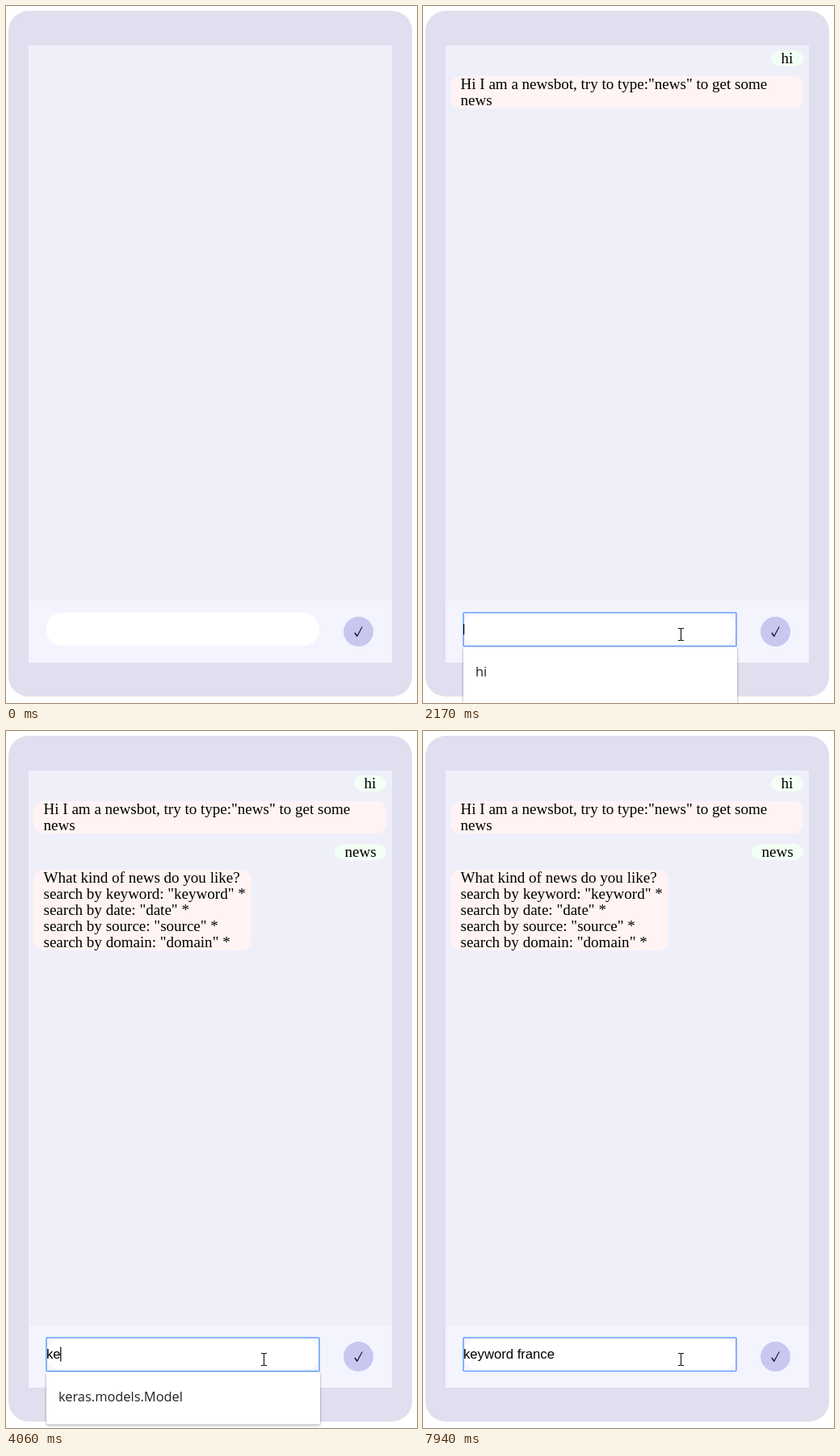
These frames come from a looping animation (509 px wide and 864 px high, 8000 ms). An HTML page:

```html
<!DOCTYPE html>
<html lang="en">
<head>
<meta charset="utf-8">
<title>News bot chat</title>
<style>
  html, body { margin: 0; width: 100%; height: 100%; overflow: hidden; background: #fff; }
  svg { display: block; width: 509px; height: 864px; }
  text { white-space: pre; }
  .chat { font: 19.05px "Liberation Serif", serif; fill: #000; }
  .field { font: 16.67px "Liberation Sans", sans-serif; fill: #000; }
  .menu text { font: 16.4px "Open Sans", sans-serif; fill: #222; }
  .menu rect { fill: #fff; filter: drop-shadow(0 1px 1.5px rgba(0, 0, 0, .4)); }
</style>
</head>
<body>
<svg id="stage" viewBox="0 0 509 864">
  <rect x="3" y="6" width="500" height="850" rx="25" fill="#e0dfef"/>
  <rect x="28" y="49" width="450" height="765" fill="#efeffa"/>
  <rect x="28" y="737" width="450" height="77" fill="#f4f4ff"/>
  <rect x="50" y="752" width="338" height="41" rx="20" fill="#fff"/>
  <circle cx="436.5" cy="775.5" r="18.5" fill="#c7c7f0"/>
  <path d="M431.3 777.2L432.6 776.6L434.8 780L440.6 769.4L441.8 769.4L435.2 781.8L434.2 781.8Z" fill="#15101c"/>
  <g id="log" class="chat"></g>
  <rect id="ring" x="50" y="752" width="338" height="41.5" rx="1" fill="none" stroke="#6aa2f6" stroke-width="1.6"/>
  <text id="typed" class="field" x="50" y="778"></text>
  <rect id="caret" width="1.2" fill="#000"/>
  <g id="menus" class="menu"></g>
  <circle id="click" cx="317" cy="778" r="15" fill="#ffff80"/>
  <path id="beam" d="M-3.5 -7.5H-1L0 -6.8L1 -7.5H3.5M0 -6.8V6.8M-3.5 7.5H-1L0 6.8L1 7.5H3.5" fill="none" stroke="#111" stroke-width="1.1"/>
  <path id="arrow" d="M.5 .5V16L4 12.7L6.4 18.3L8.8 17.3L6.4 11.8H11.3Z" fill="#fff" stroke="#000"/>
</svg>
<script>
const LOOP = 8000;
const $ = id => document.getElementById(id);

function add(parent, tag, attrs, content = "") {
  const el = document.createElementNS("http://www.w3.org/2000/svg", tag);
  for (const key in attrs) el.setAttribute(key, attrs[key]);
  el.textContent = content;
  parent.append(el);
  return el;
}

const show = (el, on) => el.setAttribute("visibility", on ? "visible" : "hidden");

function bubble(at, x, y, right, fill, lines) {
  const g = add($("log"), "g", {});
  add(g, "rect", { x, y, width: right - x, height: lines.length * 20, rx: 12.5, ry: Math.min(12.5, lines.length * 10), fill });
  lines.forEach((line, i) => add(g, "text", { x: x + 12.5, y: y + 16 + i * 20 }, line));
  return { at, g };
}

const USER = "#f3fff4", BOT = "#fff4f3";
const bubbles = [
  bubble(2080, 431, 55, 471, USER, ["hi"]),
  bubble(2170, 34, 87, 471, BOT, ['Hi I am a newsbot, try to type:"news" to get some', "news"]),
  bubble(3280, 407, 140, 471, USER, ["news"]),
  bubble(3280, 34, 172, 304, BOT, [
    "What kind of news do you like?",
    ...["keyword", "date", "source", "domain"].map(k => `search by ${k}: "${k}" *`)
  ])
];

// Suggestion lists open below the field, or above it when they are long.
function menu(from, to, rows) {
  const pitch = 44.6, height = rows.length * pitch + 20;
  const y = rows.length > 2 ? 750 - height : 795;
  const g = add($("menus"), "g", {});
  add(g, "rect", { x: 50, y, width: 339, height, rx: 2.5 });
  rows.forEach((row, i) => add(g, "text", { x: 65, y: y + 36 + i * pitch }, row));
  return { from, to, g };
}

const menus = [
  menu(1620, 1700, ["hi", "hello", "hey", "help", "home", "how"]),
  menu(1700, 2550, ["hi", "hi new"]),
  menu(2550, 2720, ["news", "name", "next", "node", "number", "null"]),
  menu(2720, 3040, ["news"]),
  menu(3970, 4290, ["keras.models.Model"])
];

const typing = [
  [0, ""], [1620, "h"], [1700, "hi"], [2080, ""],
  [2550, "n"], [2720, "ne"], [2810, "new"], [3040, "news"], [3280, ""]
];
const query = "keyword france";
[3970, 4060, 4290, 4440, 4590, 4760, 5080, 5300, 5620, 5850, 6000, 6160, 6310, 6380]
  .forEach((at, i) => typing.push([at, query.slice(0, i + 1)]));

const caretSteps = [[0, false], [1380, true], [3800, false], [3970, true], [6930, false], [7410, true], [7940, false]];
const clickSteps = [[0, 0], [1380, 1], [1470, .5], [1550, 0]];

const valueAt = (steps, t) => steps.findLast(([at]) => at <= t)[1];

function drawPointer(t) {
  const step = Math.min(6, Math.floor((t - 690) / 76.6));
  const p = 1 - Math.pow(1 - Math.max(0, step) / 6, 1.6);
  const x = 378 - 58.5 * p, y = 830 - 51 * p;
  const inField = x < 388 && y < 793;
  for (const [el, on] of [[$("beam"), inField], [$("arrow"), !inField]]) {
    el.setAttribute("transform", `translate(${x.toFixed(1)} ${y.toFixed(1)})`);
    show(el, t >= 690 && on);
  }
  $("click").setAttribute("opacity", valueAt(clickSteps, t));
}

function drawField(t) {
  const text = valueAt(typing, t), typed = $("typed"), caret = $("caret");
  if (typed.textContent !== text) typed.textContent = text;
  show($("ring"), t >= 1380);
  show(caret, valueAt(caretSteps, t));
  caret.setAttribute("x", text ? 49.6 + typed.getComputedTextLength() : 50);
  caret.setAttribute("y", text ? 763.5 : 766);
  caret.setAttribute("height", text ? 18 : 13);
}

function draw(t) {
  for (const b of bubbles) show(b.g, t >= b.at);
  for (const m of menus) show(m.g, t >= m.from && t < m.to);
  drawField(t);
  drawPointer(t);
}

const start = performance.now();
function tick() {
  draw((performance.now() - start) % LOOP);
  requestAnimationFrame(tick);
}
tick();
</script>
</body>
</html>
```
